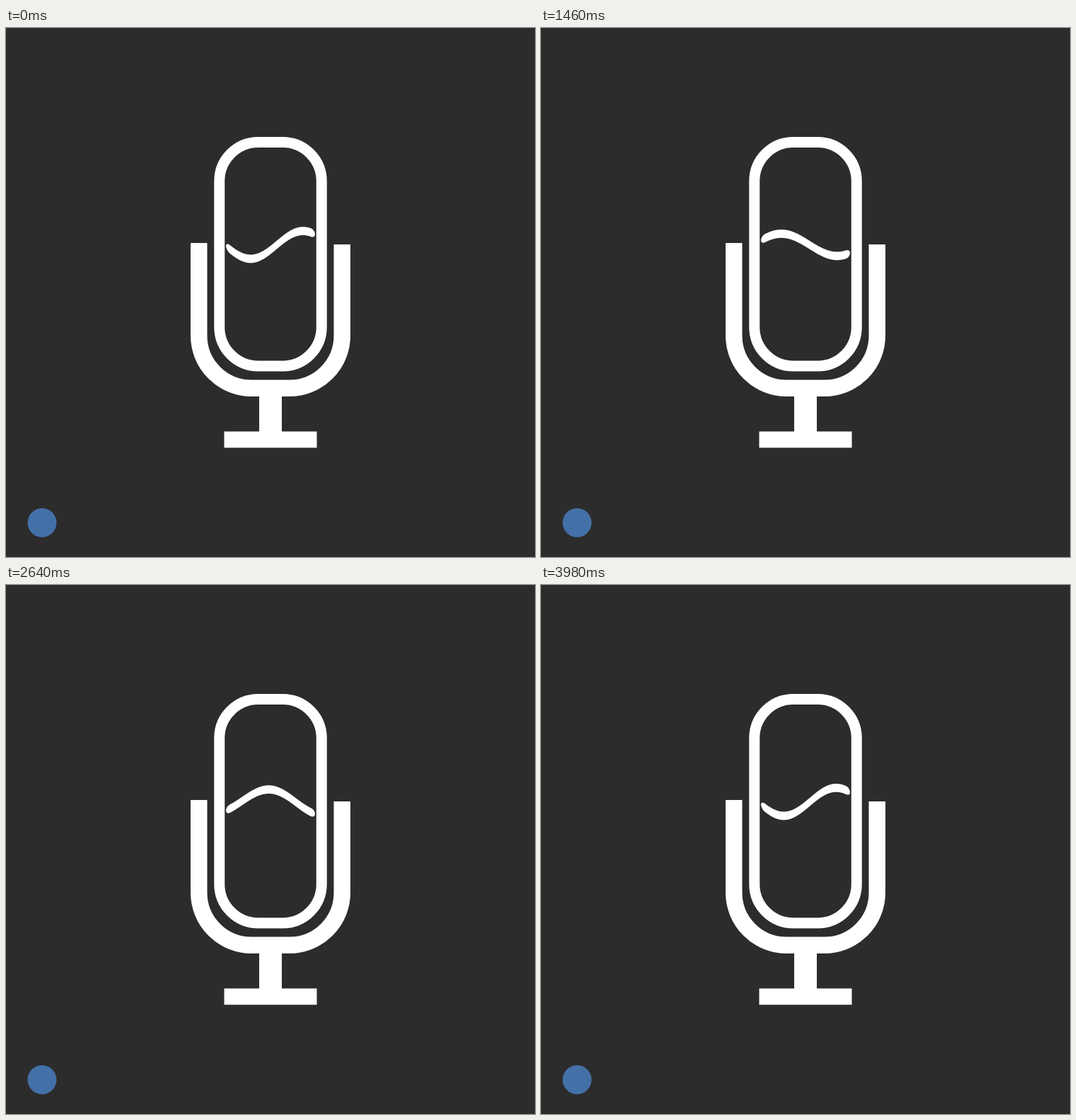
These frames come from a looping animation (748x748 px, 4 s). An HTML page:

```html
<!DOCTYPE html>
<html lang="en">
<head>
<meta charset="utf-8">
<title>Microphone</title>
<style>
  html, body { margin: 0; width: 100%; height: 100%; overflow: hidden; background: #2c2c2c; }
  svg { display: block; width: 100%; height: 100%; }
</style>
</head>
<body>
<svg viewBox="0 0 748 748" fill="none" stroke="#fff">
  <rect x="301.75" y="161.5" width="144.5" height="316.5" rx="55" stroke-width="15"/>
  <path d="M272.75 304V435A74.5 74.25 0 0 0 347.25 509.25H400.75A74.5 74.25 0 0 0 475.25 435V306" stroke-width="23.5"/>
  <path d="M358 515H390V570.5H439.5V593.5H308.5V570.5H358Z" fill="#fff" stroke="none"/>
  <path id="wave" fill="#fff" stroke="none"/>
  <circle cx="51" cy="699.5" r="20.5" fill="#4470a8" stroke="none"/>
</svg>
<script>
  const wave = document.getElementById('wave');
  const LEFT = 311, RIGHT = 437, MID_Y = 306.4, RADIUS = 5.9;
  const AMPLITUDE = 17.75, LENGTH = 152, CREST = 422.5, PERIOD = 1000, STEP = 20;
  const TAU = 2 * Math.PI;

  // Centre line: a slight fixed S-bend plus a sine travelling to the right.
  function centre(x, t) {
    const bend = -2.25 * Math.sin(TAU * (x - (LEFT + RIGHT) / 2) / (RIGHT - LEFT));
    return MID_Y + bend - AMPLITUDE * Math.cos(TAU * ((x - CREST) / LENGTH - t / PERIOD));
  }

  // Half the vertical thickness of a bar with round ends.
  function half(x) {
    const inset = Math.max(0, RADIUS - Math.min(x - LEFT, RIGHT - x));
    return Math.sqrt(RADIUS * RADIUS - inset * inset);
  }

  function draw(now) {
    const t = Math.floor(now / STEP) * STEP % PERIOD;
    const top = [], bottom = [];
    for (let x = LEFT; x <= RIGHT; x += 0.5) {
      const y = centre(x, t), h = half(x);
      top.push(`${x} ${(y - h).toFixed(2)}`);
      bottom.unshift(`${x} ${(y + h).toFixed(2)}`);
    }
    wave.setAttribute('d', `M${top.concat(bottom).join('L')}Z`);
  }

  const start = performance.now();
  function tick() {
    draw(performance.now() - start);
    requestAnimationFrame(tick);
  }
  tick();
</script>
</body>
</html>
```
